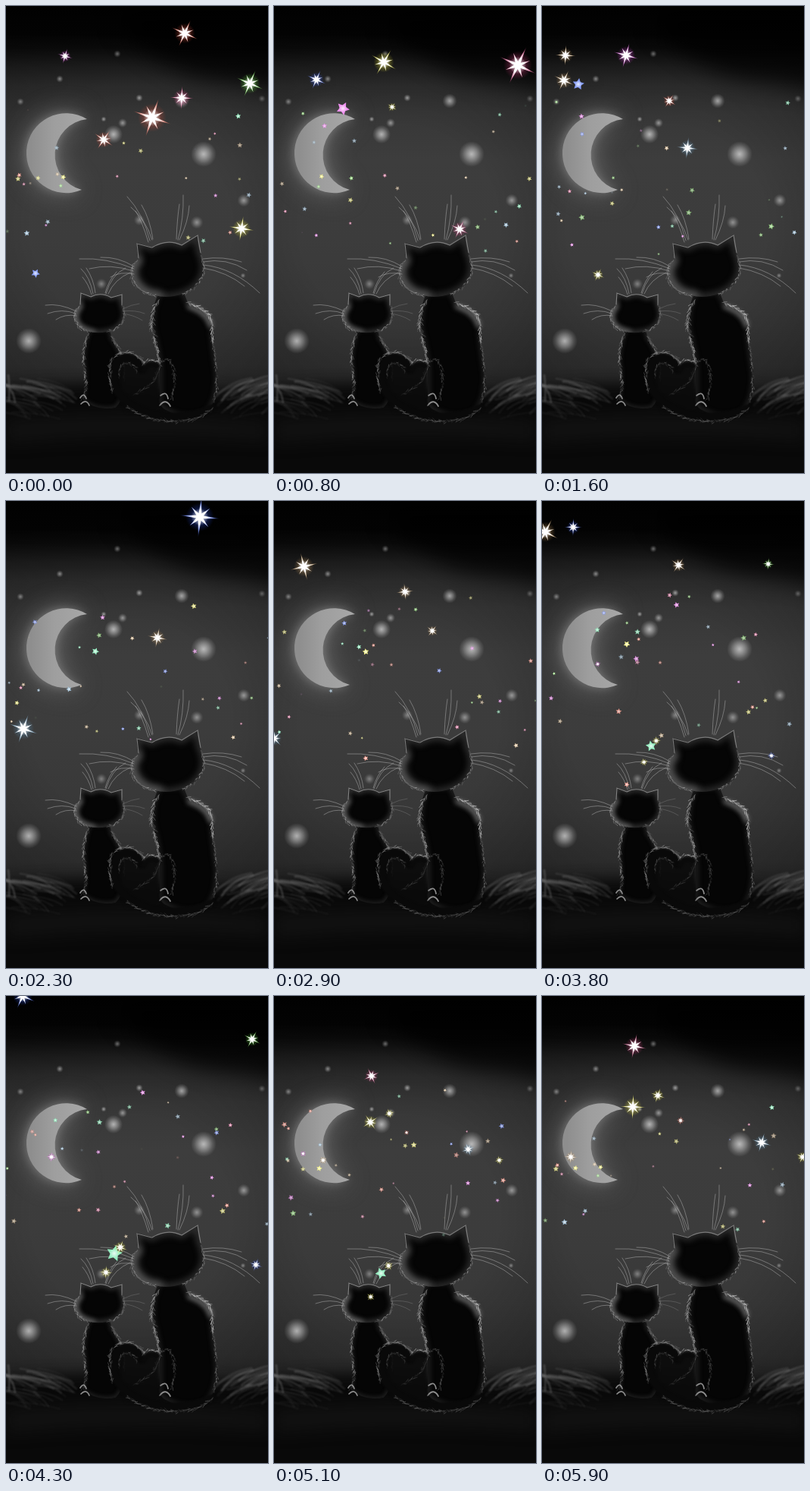
Animation of 346x615 px, one loop 6 s. Source, as an HTML page with a canvas:

```html
<!DOCTYPE html>
<html lang="en">
<head>
<meta charset="utf-8">
<title>Cats under the stars</title>
<style>
html, body { margin: 0; width: 100%; height: 100%; overflow: hidden; background: #000; }
canvas { display: block; width: 346px; height: 615px; }
</style>
</head>
<body>
<canvas id="stage" width="346" height="615"></canvas>
<script>
const W = 346, H = 615, LOOP = 6000, STEP = 100, TAU = Math.PI * 2;
const ctx = document.getElementById('stage').getContext('2d');
const scene = document.createElement('canvas');
scene.width = W;
scene.height = H;
const bg = scene.getContext('2d');

const rand = n => {
  const v = Math.sin(n * 127.1 + 11.7) * 43758.5453;
  return v - Math.floor(v);
};
const gray = (v, a = 1) => `rgba(${v},${v},${v},${a})`;

function glow(c, x, y, r, color, clear) {
  const g = c.createRadialGradient(x, y, 0, x, y, r);
  g.addColorStop(0, color);
  g.addColorStop(1, clear);
  c.fillStyle = g;
  c.fillRect(x - r, y - r, r * 2, r * 2);
}

function line(d, color, width, blur = 0) {
  bg.save();
  if (blur) bg.filter = `blur(${blur}px)`;
  bg.strokeStyle = color;
  bg.lineWidth = width;
  bg.lineCap = 'round';
  bg.stroke(new Path2D(d));
  bg.restore();
}

function shape(d, color, blur = 0) {
  bg.save();
  if (blur) bg.filter = `blur(${blur}px)`;
  bg.fillStyle = color;
  bg.fill(new Path2D(d));
  bg.restore();
}

// Short hairs scattered along a path, leaning along its direction.
function fur(d, shade, alpha, len = 5) {
  const path = document.createElementNS('http://www.w3.org/2000/svg', 'path');
  path.setAttribute('d', d);
  const total = path.getTotalLength();
  bg.save();
  bg.lineWidth = .8;
  for (let s = 0; s < total; s += .8) {
    const p = path.getPointAtLength(s), q = path.getPointAtLength(s + 1);
    const lean = Math.atan2(q.y - p.y, q.x - p.x) + (rand(s + total) - .5) * 1.3;
    const reach = len * (.4 + rand(s + 3) * .8);
    const x = p.x + (rand(s + 9) - .5) * 2.5, y = p.y + (rand(s + 15) - .5) * 2.5;
    bg.strokeStyle = gray(shade, alpha * rand(s + 21));
    bg.beginPath();
    bg.moveTo(x, y);
    bg.lineTo(x + Math.cos(lean) * reach, y + Math.sin(lean) * reach);
    bg.stroke();
  }
  bg.restore();
}

// Black silhouette with a faint lit edge inside its outline.
function silhouette(d, rim, width) {
  shape(d, gray(5), .5);
  bg.save();
  bg.clip(new Path2D(d));
  line(d, gray(rim, .6), width, width / 2);
  bg.restore();
}

function drawSky() {
  const g = bg.createLinearGradient(0, 0, 0, H);
  [[0, 2], [.06, 4], [.09, 12], [.13, 32], [.17, 46], [.23, 55], [.33, 61], [.5, 60],
   [.66, 56], [.77, 49], [.84, 36], [1, 8]]
    .forEach(([p, v]) => g.addColorStop(p, gray(v)));
  bg.fillStyle = g;
  bg.fillRect(0, 0, W, H);
  shape('M150 30Q215 92 280 98T380 122V0H150Z', gray(0, .72), 14);
  const v = bg.createRadialGradient(165, 290, 130, 165, 290, 340);
  v.addColorStop(0, gray(0, 0));
  v.addColorStop(1, gray(0, .35));
  bg.fillStyle = v;
  bg.fillRect(0, 0, W, H);
}

function drawMoon() {
  const moon = 'M107 149A52.5 52.5 0 1 0 100 242A47.4 47.4 0 0 1 107 149Z';
  shape(moon, gray(160, .55), 17);
  shape(moon, gray(170, .4), 6);
  const g = bg.createLinearGradient(33, 0, 108, 0);
  g.addColorStop(0, gray(142));
  g.addColorStop(.4, gray(158));
  g.addColorStop(1, gray(168));
  shape(moon, g, .6);
}

function drawOrbs() {
  [[142, 169, 10, .75], [154, 154, 5, .55], [129, 149, 3, .6], [232, 125, 8, .65],
   [261, 195, 14, .8], [176, 121, 4, .6], [147, 63, 4, .4], [71, 96, 4, .5],
   [19, 126, 4, .45], [314, 256, 7, .55], [252, 285, 7, .5], [176, 282, 6, .4],
   [30, 441, 14, .75], [126, 366, 6, .4], [313, 355, 3, .45], [338, 122, 4, .3]]
    .forEach(([x, y, r, a]) => {
      glow(bg, x, y, r * 1.2, gray(205, a), gray(190, 0));
      glow(bg, x, y, r * .85, gray(205, a * .35), gray(190, 0));
    });
}

function drawGround() {
  shape('M-20 508Q70 492 173 502T366 506V640H-20Z', gray(9), 9);
  shape('M0 545Q170 530 346 548V572Q170 560 0 575Z', gray(26, .5), 10);
  for (let i = 0; i < 64; i++) {
    const dir = i % 2 ? -1 : 1;
    const x = (i % 2 ? 98 : 274) + dir * rand(i + 5) * 75;
    const y = 506 + rand(i + 90) * 38;
    const len = 28 + rand(i + 170) * 42;
    const rise = 8 + rand(i + 250) * 20;
    const fade = Math.max(.1, 1 - (y - 506) / 38);
    line(`M${x} ${y}q${dir * len * .4} ${-rise * .85} ${dir * len} ${-rise}`,
      gray(135, .08 + rand(i + 330) * .38 * fade), 1 + rand(i + 410) * 2, .8);
  }
  line('M3 486Q5 500 4 520M0 498Q10 506 12 522', gray(120, .5), 2, .8);
}

function drawBigCat() {
  silhouette('M203 376Q192 395 193 425Q202 458 203 480L203 515Q200 526 211 532Q235 546 262 538Q282 522 279 480Q275 456 273 435Q274 405 240 391L234 376Z', 55, 6);
  line('M242 396Q266 404 270 420', gray(150, .65), 6, 3);
  fur('M238 390Q264 398 271 412Q274 428 272 440', 215, .75, 6);
  fur('M272 438Q277 462 278 485T274 518', 150, .55, 4);
  fur('M203 386Q191 402 193 426Q200 452 203 474', 195, .75, 6);
  fur('M204 470Q216 460 220 474Q226 495 218 518', 140, .5, 4);
  line('M204 513Q212 506 214 517M203 526Q211 516 217 527', gray(185, .75), 1.8, .6);

  const head = 'M173 312L193 318Q213 306 232 315L253 301Q252 315 257 326Q264 340 260 354Q254 372 234 379Q214 386 196 381Q170 378 165 354Q164 342 175 334Q172 322 173 312Z';
  silhouette(head, 80, 8);
  bg.save();
  bg.clip(new Path2D(head));
  line('M172 336Q160 350 173 368Q184 382 200 382', gray(95, .75), 15, 5);
  bg.restore();
  line('M175 332L173 313L192 318M193 318Q213 306 232 315L253 302L257 325', gray(175, .6), 1.1, .4);
  fur('M175 334Q163 343 166 356Q171 377 196 381', 170, .6, 4);
  fur('M257 327Q264 342 260 354Q254 371 234 379', 170, .6, 4);
}

function drawSmallCat() {
  silhouette('M111 425Q102 445 102 468Q106 490 101 518Q118 534 145 529Q162 510 156 478Q151 451 139 437L137 425Z', 50, 5);
  fur('M110 430Q101 450 103 474L106 496', 180, .65, 5);
  fur('M138 434Q151 450 155 470L157 490', 170, .6, 5);
  fur('M106 492Q108 506 101 516', 130, .5, 4);
  line('M98 516Q103 508 106 517M99 524Q106 517 110 526', gray(185, .75), 1.7, .6);

  const head = 'M99 377L112 383Q125 376 139 384L153 379Q151 387 154 394Q159 405 155 414Q148 427 134 429Q118 432 108 428Q91 424 90 408Q91 399 98 394Q98 385 99 377Z';
  silhouette(head, 85, 6);
  bg.save();
  bg.clip(new Path2D(head));
  line('M97 396Q88 406 94 419Q102 428 114 430', gray(115, .7), 8, 3);
  bg.restore();
  line('M98 393L99 378L112 383Q125 376 139 384L153 380L153 394', gray(180, .65), 1.1, .4);
  fur('M98 394Q89 402 91 412Q95 426 110 429', 180, .6, 4);
  fur('M154 394Q159 406 154 415Q148 427 134 429', 170, .6, 4);
}

// Two tails curled into a heart.
function drawTails() {
  shape('M146 500Q140 468 160 464Q176 466 180 480Q190 468 202 474V535H160Z', gray(11, .92), 2);
  line('M272 530Q238 546 194 538Q146 524 142 490Q140 464 160 463Q174 465 178 478', gray(9), 11, 1);
  line('M182 480Q188 468 200 474', gray(10), 7, 1);
  fur('M141 510Q134 482 139 467Q147 455 162 456Q176 459 181 470', 165, .65, 5);
  fur('M180 473Q188 463 202 469', 190, .7, 4);
  fur('M150 490Q147 472 160 470Q170 472 173 482', 105, .55, 4);
  fur('M168 512Q196 500 200 484', 85, .5, 5);
  fur('M274 528Q258 546 228 547Q190 548 160 528', 130, .55, 5);
}

function drawWhiskers() {
  const bright = gray(175, .65), dim = gray(140, .45);
  line('M190 309Q181 273 160 251M193 308Q184 280 165 265M188 311Q180 284 171 270M194 307Q190 280 179 262', bright, .8);
  line('M227 308Q235 280 234 249M229 308Q241 284 242 263M225 307Q226 280 229 261', bright, .8);
  line('M169 346Q133 331 97 333M168 349Q138 339 110 346M169 343Q148 330 125 331M169 353Q151 349 138 357', bright, .8);
  line('M260 337Q291 331 318 348M261 341Q301 345 335 378M260 345Q292 350 315 369M260 333Q287 329 311 337', bright, .8);
  line('M115 379Q111 357 99 346M118 378Q116 360 106 345M113 380Q109 366 101 357', bright, .8);
  line('M132 379Q139 354 158 345M135 379Q143 360 164 351M131 378Q135 362 146 350', bright, .8);
  line('M93 402Q70 391 52 394M92 405Q74 398 55 405M93 408Q78 405 66 413', bright, .8);
  line('M154 402Q171 400 183 405M154 405Q169 407 180 414M154 399Q166 393 176 392', dim, .8);
}

// Hue and saturation of each star colour.
const TINTS = {
  red: '8 80%', cream: '34 50%', gold: '58 85%', green: '105 75%', mint: '150 70%',
  blue: '228 90%', ice: '205 45%', violet: '300 75%', pink: '335 75%'
};
const tint = (color, light, alpha = 1) => `hsl(${TINTS[color]} ${light}% / ${alpha})`;

function starPath(points, r, inner, short = 1) {
  ctx.beginPath();
  for (let i = 0; i < points * 2; i++) {
    const a = i * Math.PI / points - Math.PI / 2;
    const d = i % 2 ? inner : i % 4 ? r * short : r;
    ctx.lineTo(Math.cos(a) * d, Math.sin(a) * d);
  }
  ctx.closePath();
}

function plainStar(x, y, r, color, angle, alpha = 1) {
  ctx.save();
  ctx.translate(x, y);
  ctx.rotate(angle);
  ctx.globalAlpha = alpha;
  starPath(5, r, r * .5);
  ctx.fillStyle = tint(color, 75);
  ctx.fill();
  glow(ctx, 0, 0, r * .6, gray(255, .8), gray(255, 0));
  ctx.restore();
}

function sparkle(x, y, r, color, angle) {
  ctx.save();
  ctx.translate(x, y);
  ctx.rotate(angle);
  glow(ctx, 0, 0, r * .75, tint(color, 60, .6), tint(color, 55, 0));
  const g = ctx.createRadialGradient(0, 0, 0, 0, 0, r);
  g.addColorStop(0, '#fff');
  g.addColorStop(.35, '#fff');
  g.addColorStop(.65, tint(color, 78, .9));
  g.addColorStop(1, tint(color, 60, .25));
  ctx.fillStyle = g;
  starPath(8, r * 1.05, r * .2, .66);
  ctx.fill();
  glow(ctx, 0, 0, r * .45, '#fff', gray(255, 0));
  ctx.restore();
}

// Bright stars at the peak of each burst: x, y, radius, colour.
const BURSTS = [
  { t: 0, stars: [[236, 36, 18, 'red'], [322, 102, 18, 'green'], [193, 147, 25, 'red'], [232, 121, 15, 'pink'],
    [129, 176, 14, 'red'], [311, 293, 16, 'gold'], [78, 66, 10, 'violet'], [39, 352, 6, 'blue', 'plain']] },
  { t: 800, stars: [[145, 74, 18, 'gold'], [322, 78, 25, 'pink'], [56, 97, 13, 'blue'],
    [91, 135, 9, 'violet', 'plain'], [156, 133, 7, 'gold'], [245, 294, 13, 'pink']] },
  { t: 1600, stars: [[31, 65, 13, 'cream'], [111, 65, 16, 'violet'], [29, 98, 14, 'cream'],
    [48, 103, 8, 'blue', 'plain'], [168, 125, 10, 'red'], [192, 187, 14, 'ice'], [74, 354, 9, 'gold']] },
  { t: 2300, stars: [[256, 21, 25, 'blue'], [200, 180, 13, 'cream'], [23, 300, 19, 'ice'], [118, 198, 5, 'mint', 'plain']] },
  { t: 3400, stars: [[20, 61, 24, 'cream'], [177, 100, 15, 'cream'], [116, 193, 6, 'gold', 'plain'], [116, 358, 5, 'red', 'plain']] },
  { t: 4300, stars: [[22, 0, 17, 'blue'], [325, 57, 12, 'green'], [143, 339, 11, 'mint', 'plain'],
    [151, 331, 10, 'gold'], [132, 364, 9, 'gold'], [330, 354, 9, 'blue'], [60, 212, 7, 'violet']] },
  { t: 5900, stars: [[122, 66, 16, 'pink'], [120, 146, 16, 'gold'], [153, 131, 10, 'gold'],
    [290, 193, 13, 'ice'], [38, 212, 9, 'cream'], [183, 164, 6, 'red'], [344, 212, 9, 'gold']] }
];

function drawBursts(t) {
  BURSTS.forEach(({ t: peak, stars }, b) => {
    const dt = t - peak;
    const near = BURSTS[dt < 0 ? b - 1 : b + 1];
    const span = near ? Math.abs(near.t - peak) : LOOP - peak;
    const size = Math.sqrt(Math.max(0, 1 - Math.abs(dt) / span));
    if (size < .05) return;
    stars.forEach(([x, y, r, color, plain], i) => {
      const drift = dt * .0003;
      const px = x + (x - 150) * drift, py = y + (y - 230) * drift;
      const angle = rand(b * 10 + i) * .6 + dt * .0008;
      (plain ? plainStar : sparkle)(px, py, r * size, color, angle);
    });
  });
}

function drawDust(t) {
  const life = 1500, colors = Object.keys(TINTS);
  for (let i = 0; i < 32; i++) {
    const clock = t + rand(i) * life;
    const turn = Math.floor(clock / life) % 4;
    const p = clock % life / life;
    const seed = i * 7 + turn * 311 + 40;
    const spread = .85 + p * .3;
    const x = 150 + (Math.pow(rand(seed), 1.2) * 346 - 150) * spread;
    const y = 230 + (125 + rand(seed + 1) * 195 - 230) * spread;
    const r = (2.2 + rand(seed + 2) * 2.2) * (.6 + .4 * Math.sin(p * Math.PI));
    const alpha = Math.min(1, Math.sin(p * Math.PI) * 2) * (.55 + rand(seed + 4) * .45);
    plainStar(x, y, r, colors[Math.floor(rand(seed + 3) * colors.length)], rand(seed + 5) * TAU, alpha);
  }
}

function frame(now) {
  const t = Math.floor(now % LOOP / STEP) * STEP;
  ctx.drawImage(scene, 0, 0);
  drawDust(t);
  drawBursts(t);
  requestAnimationFrame(frame);
}

[drawSky, drawMoon, drawOrbs, drawGround, drawBigCat, drawSmallCat, drawTails, drawWhiskers]
  .forEach(draw => draw());
const start = performance.now();
requestAnimationFrame(() => frame(0));
</script>
</body>
</html>
```
